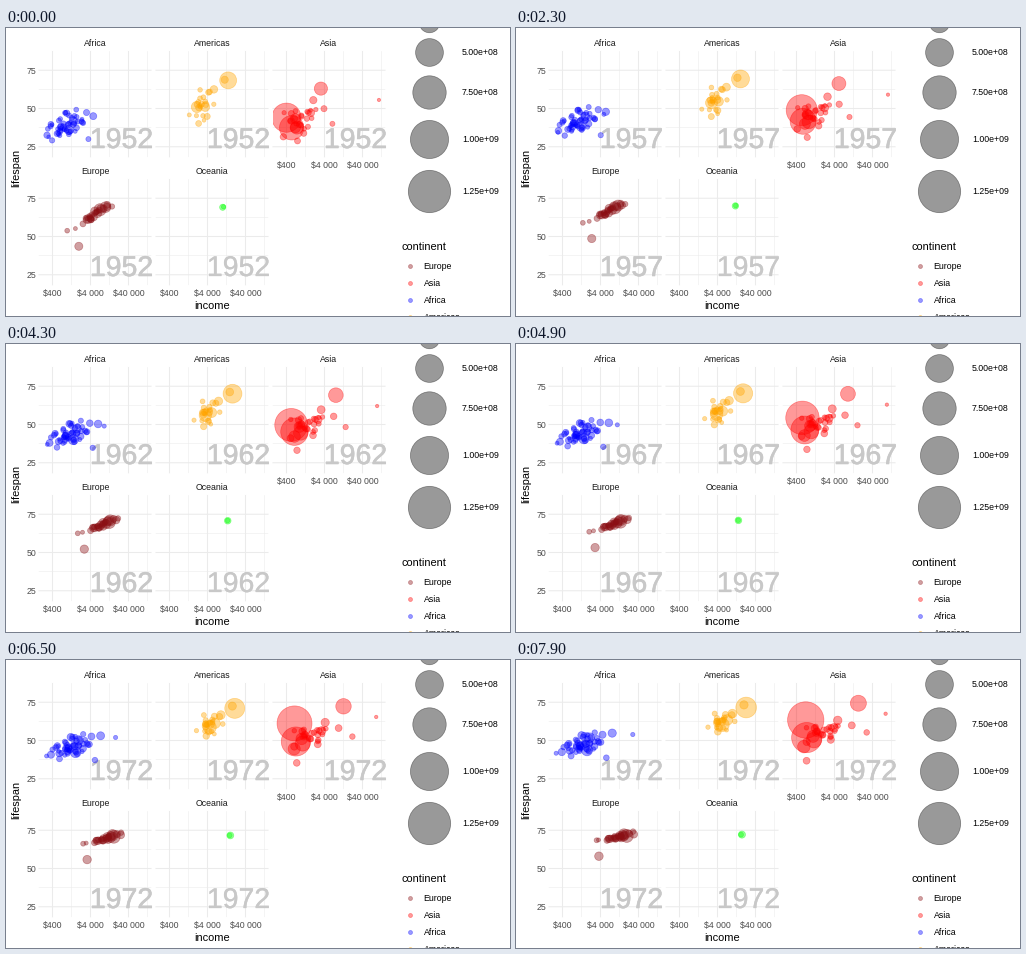
A matplotlib script that plays this animation: 504x288 px, repeating every 8 s.

```python
import matplotlib.pyplot as plt
import numpy as np
from matplotlib.animation import FuncAnimation
from matplotlib.patches import Rectangle
from matplotlib.patheffects import Normal, Stroke

W, H, DPI = 504, 288, 72
FRAMES, STEP = 80, 199 / 11      # STEP: frames per five years
PW, PH = 112, 105.3              # panel size
DECADE, YEAR = 38, 1.53          # px per tenfold income, px per year of life
ALPHA = 0.4
BLUE, ORANGE, RED = (0, 0, 1), (1, 0.647, 0), (1, 0, 0)
BROWN, GREEN, BLACK = (0.545, 0.06, 0.08), (0, 1, 0), (0, 0, 0)
DARK, MID, GRID, YEAR_GREY = "#1A1A1A", "#4D4D4D", "#EBEBEB", "#C8C8C8"
COLS, ROWS = (33, 150, 267), (23.5, 151.5)

plt.rcParams["font.family"] = "Liberation Sans"


def crowd(n, seed, income, spread, life, slope, noise, pop, rise, catch_up):
    """Countries scattered around a trend line; lives close in on 74 years."""
    rng = np.random.default_rng(seed)
    off = spread * np.clip(rng.normal(size=n), -2, 2)
    start = life + slope * off + noise * np.clip(rng.normal(size=n), -2, 2)
    people = pop * np.exp(0.8 * np.clip(rng.normal(size=n), -2, 1.5))
    first = income * 10 ** off
    last = first * rise * 10 ** rng.normal(0, 0.07, n)
    return np.array([first, start, people, last,
                     start + catch_up * (74 - start)])


def radius(millions):
    return 1.42 + 20.3 * np.sqrt(millions / 1318.7)


def label(x, y, text, size=8.8, color=MID, ha="center"):
    ax.text(x, y + 0.36 * size, text, size=size, color=color, ha=ha)


def dots(color, x=(), y=(), r=0):
    return ax.scatter(x, y, s=(2 * r) ** 2, color=[(*color, ALPHA)],
                      linewidths=0.7, zorder=3)


class Panel:
    """One continent: `big` holds (income, life, millions) in 1952 and
    (income, life) in 1972; `path` is an uneven (incomes, lives) course."""

    def __init__(self, name, col, row, color, big, others=None, growth=1.55,
                 bend=1, path=None):
        left, top = COLS[col], ROWS[row]
        self.x0, self.y0 = left + 51.5, top + 57
        self.data = np.array(big, float).T
        if others is not None:
            self.data = np.hstack([self.data, others])
        self.growth, self.bend, self.path = growth, bend, path

        self.grid(left, top)
        label(left + 56, top - 8.5, name, color=DARK)
        self.year = ax.text(left + 82.5, top + 96.5, "", size=28.45,
                            color=YEAR_GREY, ha="center", zorder=2)
        weight = 0.3 if others is None else 0.6
        self.year.set_path_effects(
            [Stroke(linewidth=weight, foreground=YEAR_GREY), Normal()])
        self.dots = dots(color)
        for art in (self.year, self.dots):
            art.set_clip_path(Rectangle((left, top), PW, PH,
                                        transform=ax.transData))

    def grid(self, left, top):
        for i in range(-3, 4):
            x = self.x0 + DECADE * i / 2
            y = self.y0 + YEAR * 12.5 * i
            if left < x < left + PW:
                ax.plot([x, x], [top, top + PH], color=GRID, snap=False,
                        lw=1.07 if i % 2 == 0 else 0.53, zorder=0)
            if top < y < top + PH:
                ax.plot([left, left + PW], [y, y], color=GRID, snap=False,
                        lw=1.07 if i % 2 == 0 else 0.53, zorder=0)

    def update(self, t):
        u = t / 4
        income, life, pop, income_end, life_end = self.data
        power = np.log10(income) + u * np.log10(income_end / income)
        life = life + (life_end - life) * u ** self.bend
        if self.path:
            incomes, lives = self.path
            power[0] = np.interp(t, range(6), np.log10(incomes))
            life[0] = np.interp(t, range(6), lives)
        x = self.x0 + DECADE * (power - np.log10(4000))
        y = self.y0 - YEAR * (life - 50)
        self.dots.set_offsets(np.column_stack([x, y]))
        self.dots.set_sizes((2 * radius(pop * self.growth ** u)) ** 2)
        self.year.set_text(str(1952 + 5 * int(t + 0.5)))


fig = plt.figure(figsize=(W / DPI, H / DPI), dpi=DPI, facecolor="white")
ax = fig.add_axes([0, 0, 1, 1])
ax.set(xlim=(0, W), ylim=(H, 0))
ax.axis("off")
ax.set_autoscale_on(False)

panels = [
    Panel("Africa", 0, 0, BLUE,
          [(4725, 45, 14, 7766, 54), (1077, 36, 33, 1698, 43),
           (1419, 42, 22, 2024, 51), (3521, 30, 4, 5473, 38),
           (2388, 43, 1, 23000, 53)],
          crowd(47, 4, income=950, spread=0.26, life=39.5, slope=7, noise=4,
                pop=3, rise=1.4, catch_up=0.22), growth=1.6),
    Panel("Americas", 1, 0, ORANGE,
          [(13990, 68.4, 158, 21806, 71.3), (2109, 51, 57, 4986, 59.5),
           (3478, 51, 30, 6809, 62.4), (11367, 68.8, 15, 18971, 72.9),
           (5911, 62.5, 18, 9443, 67.1)],
          crowd(20, 2, income=2900, spread=0.17, life=51.5, slope=24, noise=6,
                pop=3, rise=1.65, catch_up=0.42)),
    Panel("Asia", 2, 0, RED,
          [(400, 44, 556, 677, 63.1), (547, 37.4, 372, 724, 50.7),
           (750, 37.5, 82, 1111, 49.2), (3217, 63, 86, 14779, 73.4),
           (684, 37.5, 47, 630, 45.3), (685, 43.4, 41, 1050, 51.9),
           (779, 28.8, 8, 740, 36.1), (6460, 40, 4, 24837, 54),
           (108382, 55.6, 0.2, 90000, 66.5)],
          crowd(24, 7, income=1400, spread=0.33, life=47, slope=13, noise=6,
                pop=5, rise=2.1, catch_up=0.38),
          path=((400, 576, 488, 613, 677, 741),
                (44, 50.5, 44.5, 58.4, 63.1, 64))),
    Panel("Europe", 0, 1, BROWN,
          [(1969, 43.6, 22, 3451, 57), (974, 53.8, 3, 2860, 67.4),
           (1601, 55.2, 1, 3313, 67.7), (7144, 67.5, 69, 18016, 71),
           (9980, 69.2, 50, 15895, 72), (14734, 69.6, 5, 27195, 73.8)],
          crowd(24, 5, income=5400, spread=0.19, life=65.5, slope=18, noise=1.2,
                pop=8, rise=2.3, catch_up=0.6), growth=1.16, bend=0.85),
    Panel("Oceania", 1, 1, GREEN,
          [(10040, 69.1, 9, 16789, 71.9), (10557, 69.4, 2, 16046, 71.9)]),
]

for top in ROWS:
    for i, age in enumerate(("75", "50", "25")):
        label(30.5, top + 18.9 + 38.25 * i, age, ha="right")
for left, y in zip(COLS, (265, 265, 137)):
    for i, money in enumerate(("$400", "$4 000", "$40 000")):
        label(left + 13.5 + DECADE * i, y, money)
label(206, 277, "income", 11, "black")
ax.text(10, 140, "lifespan", size=11, rotation=90, ha="center", va="center")

# Size legend
for y, pop in zip((-6.5, 24, 63.5, 110.5, 163), range(250, 1251, 250)):
    dots(BLACK, [423], [y], radius(pop))
    if y > 0:
        label(456, y, f"{pop * 1e6:.2e}", color="black", ha="left")

# Colour legend
label(395, 218, "continent", 11, "black", "left")
for i, (name, color) in enumerate((("Europe", BROWN), ("Asia", RED),
                                   ("Africa", BLUE), ("Americas", ORANGE))):
    y = 238 + 17.1 * i
    dots(color, [404], [y], 2)
    label(417.5, y, name, color="black", ha="left")


def draw(k):
    for panel in panels:
        panel.update(k / STEP)
    return []


anim = FuncAnimation(fig, draw, frames=FRAMES, init_func=lambda: draw(0),
                     interval=100, repeat=True, repeat_delay=0)
plt.show()
```
